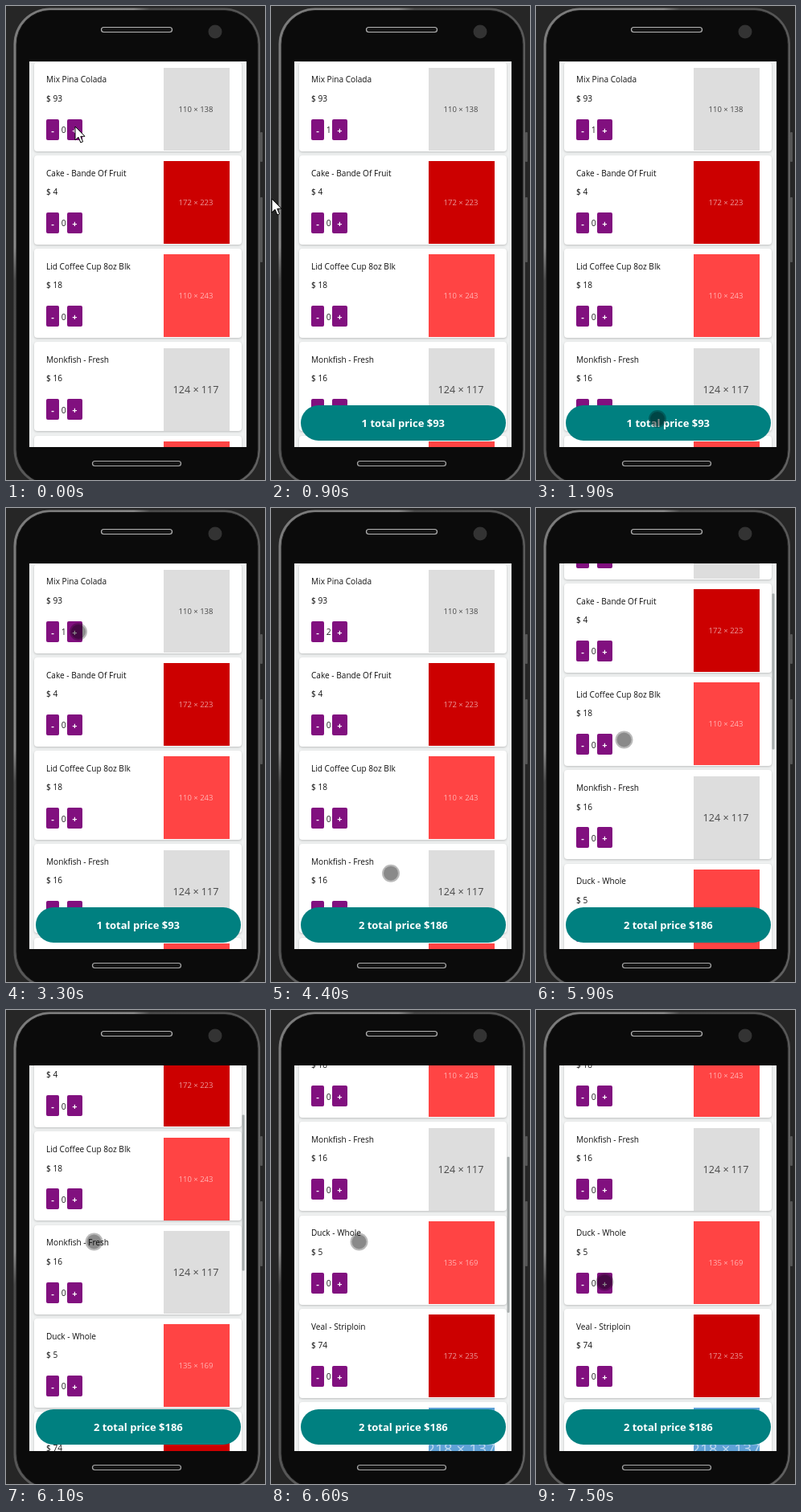
Animation, 322 px wide and 590 px high, one loop 8000 ms. Source, as an HTML page with a canvas:

```html
<!DOCTYPE html>
<html lang="en">
<head>
<meta charset="utf-8">
<title>Shopping list</title>
<style>
  html, body { margin: 0; width: 100%; height: 100%; overflow: hidden; background: #262626; }
  canvas { display: block; width: 322px; height: 590px; }
</style>
</head>
<body>
<canvas id="stage"></canvas>
<script>
const W = 322, H = 590, LOOP = 8000, STEP = 100;
const SCREEN = { x: 29, y: 69, w: 270, h: 480 };
const PITCH = 116.25, CARD_TOP = 69.5, SCROLL_END = 279;
const FONT = '"Open Sans", "Noto Sans", sans-serif';

const GRAY = '#dddddd', RED = '#cc0000', CORAL = '#ff4444', BLUE = '#5fa2d6';
const items = [
  { name: 'Mix Pina Colada', price: 93, label: '110 × 138', color: GRAY },
  { name: 'Cake - Bande Of Fruit', price: 4, label: '172 × 223', color: RED },
  { name: 'Lid Coffee Cup 8oz Blk', price: 18, label: '110 × 243', color: CORAL },
  { name: 'Monkfish - Fresh', price: 16, label: '124 × 117', color: GRAY, size: 12.6 },
  { name: 'Duck - Whole', price: 5, label: '135 × 169', color: CORAL },
  { name: 'Veal - Striploin', price: 74, label: '172 × 235', color: RED },
  { name: 'Soup - Chili', price: 62, label: '218 × 137', color: BLUE, size: 19 }
];

const spot = {
  start: [86, 150], plus: [90, 154], edge: [1, 240], away: [185, 606],
  total: [151, 514], pillEnd: [275, 515], corner: [69, 85],
  count: [77, 152], list: [109.5, 288.5], duckPlus: [85.5, 338.5]
};
// Where the pointer is at each time; it glides between the stops
const route = [
  [0, spot.start], [200, spot.start], [300, spot.plus], [600, spot.plus], [900, spot.edge],
  [1500, spot.away], [1600, spot.away], [1900, spot.total], [2000, spot.total],
  [2400, spot.pillEnd], [2600, spot.corner], [2700, spot.corner], [3300, spot.plus],
  [3600, spot.plus], [3700, spot.corner], [3900, spot.pillEnd], [4200, spot.away],
  [4300, spot.away], [4600, spot.count], [4800, spot.count], [5000, spot.pillEnd],
  [5200, spot.pillEnd], [5400, spot.list], [6700, spot.list], [7500, spot.duckPlus]
];

const canvas = document.getElementById('stage');
const dpr = window.devicePixelRatio || 1;
canvas.width = W * dpr;
canvas.height = H * dpr;
const ctx = canvas.getContext('2d');
ctx.scale(dpr, dpr);

const arrow = new Path2D('M0 0v17l4-3.7 2.8 6.7 2.8-1.2-2.8-6.4 5.2-.2z');

function progress(t, from, to) {
  return Math.min(1, Math.max(0, (t - from) / (to - from)));
}

function pointerAt(t) {
  const next = route.findIndex(stop => stop[0] > t);
  if (next < 0) return route[route.length - 1][1];
  const [t0, a] = route[next - 1], [t1, b] = route[next];
  const k = progress(t, t0, t1);
  return a.map((v, i) => v + (b[i] - v) * k);
}

function box(x, y, w, h, r, fill, stroke, line = 1) {
  ctx.beginPath();
  ctx.roundRect(x, y, w, h, r);
  if (fill) { ctx.fillStyle = fill; ctx.fill(); }
  if (stroke) { ctx.strokeStyle = stroke; ctx.lineWidth = line; ctx.stroke(); }
}

function disc(x, y, r, fill) {
  ctx.beginPath();
  ctx.arc(x, y, r, 0, Math.PI * 2);
  ctx.fillStyle = fill;
  ctx.fill();
}

function text(str, x, y, size, color, align = 'left', weight = 400) {
  ctx.font = `${weight} ${size}px ${FONT}`;
  ctx.textAlign = align;
  ctx.fillStyle = color;
  ctx.fillText(str, x, y);
}

function clipTo(x, y, w, h) {
  ctx.beginPath();
  ctx.rect(x, y, w, h);
  ctx.clip();
}

function drawPhone() {
  ctx.fillStyle = '#262626';
  ctx.fillRect(0, 0, W, H);
  box(316, 157, 3, 37, 1, '#555555');
  box(316, 238, 3, 81, 1, '#555555');
  const rim = ctx.createLinearGradient(0, 0, W, 160);
  rim.addColorStop(0, '#777777');
  rim.addColorStop(0.4, '#8a8a8a');
  rim.addColorStop(0.45, '#4a4a4a');
  rim.addColorStop(1, '#606060');
  box(9.5, 2.5, 306.5, 595, 45, rim);
  box(13, 5.5, 300, 589, 42, '#0b0b0b', '#1b1b1b');
  box(118.5, 26.5, 88, 6, 3, '#161616', '#b4b4b4', 1.2);
  box(107.5, 566.5, 110, 6, 3, '#161616', '#a8a8a8', 1.2);
  disc(260, 32, 8.5, '#333333');
}

function drawButton(sign, x, y, w) {
  box(x, y, w, 26, 2, '#81107f');
  text(sign, x + w / 2, y + 17.5, 11, '#ffffff', 'center', 700);
}

function drawPicture({ color, label, size = 9.5 }, y) {
  ctx.save();
  clipTo(196, y, 82, 103);
  ctx.fillStyle = color;
  ctx.fillRect(196, y, 82, 103);
  const ink = color === GRAY ? '#484848' : 'rgba(255,255,255,0.6)';
  text(label, 236, y + 51.5 + size * 0.36, size, ink, 'center');
  ctx.restore();
}

function drawCard(item, top, count) {
  const at = dy => Math.round(top + dy);
  ctx.save();
  ctx.shadowColor = 'rgba(0,0,0,0.22)';
  ctx.shadowBlur = 3 * dpr;
  ctx.shadowOffsetY = dpr;
  box(35, at(0), 258, 111, 4, '#ffffff');
  ctx.restore();

  text(item.name, 50, at(25.8), 10.1, '#111111');
  text('$ ' + item.price, 50, at(49.2), 10.1, '#111111');
  drawButton('-', 50, at(71), 16);
  drawButton('+', 76, at(71), 19);
  text(count, 71.6, at(88.5), 10.4, '#222222', 'center');
  drawPicture(item, at(7.3));
}

function drawScreen(t) {
  const count = t < 600 ? 0 : t < 3600 ? 1 : 2;
  const scroll = SCROLL_END * (1 - (1 - progress(t, 5600, 6600)) ** 1.12);
  const barAlpha = progress(t, 5600, 5700) - progress(t, 6900, 7300);

  ctx.save();
  clipTo(SCREEN.x, SCREEN.y, SCREEN.w, SCREEN.h);
  ctx.fillStyle = '#f0f2f2';
  ctx.fillRect(SCREEN.x, SCREEN.y, SCREEN.w, SCREEN.h);
  items.forEach((item, i) => {
    drawCard(item, CARD_TOP + i * PITCH - scroll, i === 0 ? count : 0);
  });
  if (count) {
    box(37, 497, 255, 44, 22, '#008080');
    const label = `${count} total price $${count * items[0].price}`;
    text(label, 164.3, 524, 13, '#ffffff', 'center', 700);
  }
  if (barAlpha > 0) {
    const thumb = SCREEN.h * 0.404;
    box(293.5, SCREEN.y + scroll * 0.408, 3, thumb, 1, `rgba(120,128,128,${0.6 * barAlpha})`);
  }
  ctx.restore();
}

function drawArrow(x, y) {
  ctx.save();
  ctx.translate(x, y);
  ctx.fillStyle = '#ffffff';
  ctx.fill(arrow);
  ctx.strokeStyle = '#000000';
  ctx.lineWidth = 1;
  ctx.stroke(arrow);
  ctx.restore();
}

// A touch disc over the screen, an arrow elsewhere
function drawPointer(t) {
  const [x, y] = pointerAt(t);
  const inside = x >= SCREEN.x && x < SCREEN.x + SCREEN.w &&
                 y >= SCREEN.y && y < SCREEN.y + SCREEN.h;
  if (t < 300 || !inside) {
    drawArrow(x, y);
  } else {
    disc(x, y, 11, 'rgba(0,0,0,0.27)');
    disc(x, y, 9, 'rgba(0,0,0,0.26)');
  }
}

const begin = performance.now();
function tick() {
  const elapsed = (performance.now() - begin) % LOOP;
  const t = Math.floor(elapsed / STEP) * STEP;
  drawPhone();
  drawScreen(t);
  drawPointer(t);
  requestAnimationFrame(tick);
}
tick();
</script>
</body>
</html>
```
